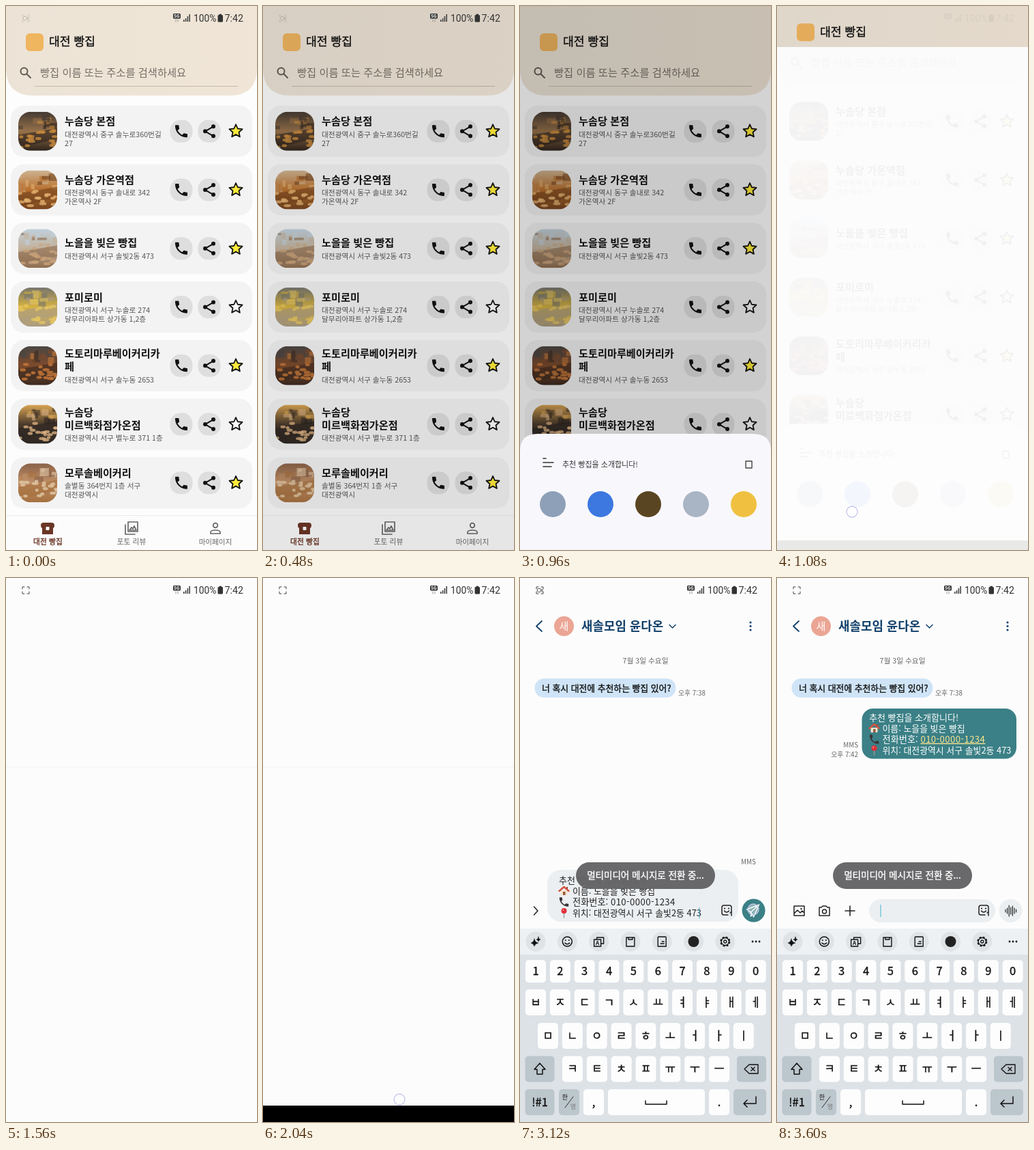
These frames come from a looping animation (368 px wide and 796 px high, 3.72 s). An HTML page:

```html
<!DOCTYPE html>
<html lang="ko">
<head>
<meta charset="utf-8">
<title>빵집 공유</title>
<style>
  html, body { margin: 0; width: 100%; height: 100%; overflow: hidden; background: #f5f5f3; }
  svg { display: block; width: 100vw; height: 100vh; font-family: 'Noto Sans CJK KR', 'Noto Sans CJK', 'Noto Sans KR', sans-serif; }
</style>
</head>
<body>
<svg id="stage" viewBox="0 0 368 796"></svg>
<script>
const LOOP = 3720, STEP = 120, PAGE = '#fcfcfc', NAVY = '#12416b', INK = '#111';

// Drawing helpers; text y is the visual middle of the line.
const rect = (x, y, w, h, r, fill, more = '') =>
  `<rect x="${x}" y="${y}" width="${w}" height="${h}" rx="${r}" fill="${fill}" ${more}/>`;
const circle = (x, y, r, fill, more = '') => `<circle cx="${x}" cy="${y}" r="${r}" fill="${fill}" ${more}/>`;
const ring = (x, y, r, stroke, w, more = '') => circle(x, y, r, 'none', `stroke="${stroke}" stroke-width="${w}" ${more}`);
const line = (d, stroke = INK, w = 1.5, fill = 'none') =>
  `<path d="${d}" stroke="${stroke}" stroke-width="${w}" fill="${fill}" stroke-linecap="round" stroke-linejoin="round"/>`;
const text = (x, y, s, size, fill = INK, more = '') =>
  `<text x="${x}" y="${y + size * .36}" font-size="${size}" fill="${fill}" ${more}>${s}</text>`;
const mid = (x, y, s, size, fill, more = '') => text(x, y, s, size, fill, 'text-anchor="middle" ' + more);
const at = (x, y, body) => `<g transform="translate(${x} ${y})">${body}</g>`;
const group = (id, body) => `<g id="${id}">${body}</g>`;
const BOLD = 'font-weight="700"', ROBOTO = 'font-family="Roboto, sans-serif"';
// A hairline outline gives a weight between regular and bold.
const medium = colour => `stroke="${colour}" stroke-width=".35"`;

// Icons, centred on 0,0
const phonePath = 'M6.6 10.8c1.4 2.8 3.8 5.1 6.6 6.6l2.2-2.2c.3-.3.7-.4 1-.2 1.1.4 2.3.6 3.6.6.6 0 1 .4 1 1V20c0 .6-.4 1-1 1C10.6 21 3 13.4 3 4c0-.6.4-1 1-1h3.5c.6 0 1 .4 1 1 0 1.2.2 2.4.6 3.6.1.3 0 .7-.3 1z';
const phone = (fill, k = 1) => `<path transform="scale(${k}) translate(-12 -12)" d="${phonePath}" fill="${fill}"/>`;
const share = line('M6-7L-6 0L6 7', INK, 2) + circle(6, -7, 3, INK) + circle(-6, 0, 3, INK) + circle(6, 7, 3, INK);
const star = on => {
  const pts = Array.from({ length: 10 }, (_, i) => {
    const a = Math.PI * (i / 5 - .5), r = i % 2 ? 4.7 : 10;
    return (r * Math.cos(a)).toFixed(2) + ' ' + (r * Math.sin(a)).toFixed(2);
  });
  return line('M' + pts.join('L') + 'Z', INK, 1.8, on ? '#ffeb3b' : '#fafafa');
};
const house = rect(-5, -1, 10, 7, 1, '#f3e3cf') + line('M-7 0L0-6L7 0', '#d4523e', 2.4) +
  rect(-1.5, 1, 3.5, 5, 0, '#9a5a3c') + rect(3.5, -6, 2, 3, 0, '#a8493a');
const pin = line('M0 0V7', '#999', 1.4) + circle(0, -3, 4, '#df2f38') + circle(-1.2, -4.2, 1.1, '#ff9a9a');
const sticker = line('M7 2V-4Q7-7 4-7H-4Q-7-7-7-4V4Q-7 7-4 7H2M-3.5 1Q0 5 3.5 1', '#222', 1.5) +
  circle(-3, -2.5, 1.1, '#222') + circle(3, -2.5, 1.1, '#222') + line('M5 4L7 2.5V8', '#222', 1.5);
const plane = line('M9-9L-9-2L-3 2L1 9ZM-3 2L9-9M-3 2V8L0 5', '#fff', 1.4);

// Bakery list: names, address, favourite, photo tones
const shops = [
  [['누솜당 본점'], ['대전광역시 중구 솔누로360번길', '27'], 1, ['#453a32', '#96714a', '#2f241d', '#c88a3c']],
  [['누솜당 가온역점'], ['대전광역시 동구 솔내로 342', '가온역사 2F'], 1, ['#cdb391', '#b8702e', '#74441f', '#e2b070']],
  [['노을을 빚은 빵집'], ['대전광역시 서구 솔빛2동 473'], 1, ['#c0d0dc', '#c3b29c', '#8d6c4e', '#c9a27a']],
  [['포미로미'], ['대전광역시 서구 누솔로 274', '달무리아파트 상가동 1,2층'], 0, ['#77766e', '#d6b23f', '#aa9c86', '#e6c660']],
  [['도토리마루베이커리카', '페'], ['대전광역시 서구 솔누동 2653'], 1, ['#4a4643', '#7d4a2b', '#3c2a20', '#c87a3a']],
  [['누솜당', '미르백화점가온점'], ['대전광역시 서구 별누로 371 1층'], 0, ['#d9a552', '#4a3a2c', '#2c2622', '#d9b080']],
  [['모루솔베이커리'], ['솔별동 364번지 1층 서구', '대전광역시'], 1, ['#8a6248', '#c09068', '#a5703f', '#e2c8a6']]
];
let seed = 7;
const rnd = () => (seed = seed * 16807 % 2147483647) / 2147483647;

function photo(i, tones) {
  const [top, wall, floor, bread] = tones;
  let s = `<linearGradient id="g${i}" x2="0" y2="1"><stop stop-color="${top}"/><stop offset=".5" stop-color="${wall}"/><stop offset="1" stop-color="${floor}"/></linearGradient>` +
    rect(0, 0, 57, 57, 0, `url(#g${i})`);
  for (let n = 0; n < 12; n++)
    s += rect(rnd() * 50, 4 + rnd() * 18, 4 + rnd() * 10, 3 + rnd() * 9, 0, tones[n % 4], 'opacity=".6"');
  s += `<path d="M0 34L57 24V40L0 53Z" fill="${floor}" opacity=".6"/>`;
  for (let n = 0; n < 18; n++)
    s += `<ellipse cx="${rnd() * 57}" cy="${26 + rnd() * 26}" rx="${2.5 + rnd() * 3}" ry="2.2" fill="${bread}" opacity=".8"/>`;
  return `<g clip-path="url(#round)">${s}</g>`;
}

function card([names, lines, fav, tones], i) {
  const c = 183.3 + 85.75 * i;
  const top = c - (19 * names.length + 13 * lines.length + 3) / 2;
  const below = top + 19 * names.length + 3;
  return rect(7, c - 37.5, 354, 75, 19, '#f3f3f3') + at(18, c - 28.5, photo(i, tones)) +
    names.map((s, n) => text(86, top + 9.5 + 19 * n, s, 15.2, INK, BOLD)).join('') +
    lines.map((s, n) => text(86, below + 6.5 + 13 * n, s, 10.7, '#555')).join('') +
    rect(240.5, c - 16.5, 33, 33, 15, '#dedede') + rect(281.5, c - 16.5, 33, 33, 15, '#dedede') +
    at(257, c, phone(INK)) + at(298, c, share) + at(337, c, star(fav));
}

const list = rect(0, 0, 368, 796, 0, '#fdfdfd') +
  '<path d="M0 0H368V91Q368 131 328 131H40Q0 131 0 91Z" fill="url(#cream)"/>' +
  rect(29, 40, 26, 26, 6, '#f0b55f') + text(63, 52, '대전 빵집', 17.2, INK, medium(INK)) +
  ring(26.5, 95.5, 5, '#5f5a54', 2) + line('M30.5 99.5L36 105', '#5f5a54', 2) +
  text(50, 97, '빵집 이름 또는 주소를 검색하세요', 15.3, '#776f67') + rect(42, 117, 298, 1, 0, '#c3b9ad') +
  shops.map(card).join('') +
  rect(0, 745, 368, 51, 0, '#fcfcfc') + rect(0, 745, 368, 1, 0, '#ececec') +
  '<path d="M55 756H67Q71 756 71 760Q71 763 69 764V773H53V764Q51 763 51 760Q51 756 55 756Z" fill="#6b3626"/>' +
  rect(58.5, 762, 5, 5, 1, '#fff') +
  line('M175 759V773H189M179 755H193V769H179ZM181 767L184 763L186 765L188 761L191 767Z', '#666', 1.7) +
  ring(307, 760, 3.3, '#666', 1.7) + line('M300 772V770Q300 767 307 767Q314 767 314 770V772Z', '#666', 1.7) +
  mid(61.5, 784, '대전 빵집', 10.8, '#6b3626', medium('#6b3626')) +
  mid(184, 784, '포토 리뷰', 10.8, '#666') + mid(307, 784, '마이페이지', 10.6, '#666');

const sheet = '<path d="M0 796V652Q0 626 26 626H342Q368 626 368 652V796Z" fill="#f8f8fc"/>' +
  line('M34 662H38M34 668H49M34 674H46', '#333', 1.6) + text(62, 671, '추천 빵집을 소개합니다!', 11, '#333') +
  line('M331 666H340V676H331Z', '#444', 1.4) +
  ['#8ea0b8', '#3c78e0', '#5a4522', '#a9b4c4', '#f0c040'].map((c, i) => circle(48 + 70 * i, 729, 19, c)).join('');

// Conversation
const message = (x, gap, ink, link) =>
  text(x, 0, '추천 빵집을 소개합니다!', 13, ink) +
  at(x + 7.5, 16, house) + text(x + gap, 16, '이름: 노을을 빚은 빵집', 12.9, ink) +
  at(x + 7.5, 32, phone('#3a3436', .75)) +
  text(x + gap, 32, `전화번호: <tspan letter-spacing=".4" ${link}>010-0000-1234</tspan>`, 13.2, ink) +
  at(x + 7.5, 48, pin) + text(x + gap, 48, '위치: 대전광역시 서구 솔빛2동 473', 12.9, ink);

const chat = rect(0, 0, 368, 796, 0, PAGE) +
  line('M32 63L24 70.5L32 78', NAVY, 1.8) + circle(64.5, 70.5, 14.5, '#eba594') + mid(64.5, 70.5, '새', 15, '#fff') +
  text(90, 70.5, '새솔모임 윤다온', 17.9, NAVY, BOLD) + line('M219 68.5L223.5 73L228 68.5', NAVY, 1.5) +
  [65, 70.5, 76].map(y => circle(338, y, 1.6, NAVY)).join('') +
  mid(184, 121, '7월 3일 수요일', 10.7, '#666') +
  rect(21.5, 147, 207, 28, 14, '#cfe4f7') +
  text(32, 161, '너 혹시 대전에 추천하는 빵집 있어?', 12.85, INK, medium(INK)) +
  text(232, 168.5, '오후 7:38', 9.8, '#666');

const draft = rect(40, 711, 280, 76, 20, '#eceff1') + at(0, 726, message(57, 20, '#222', '')) +
  rect(262.5, 766, 1, 16, 0, '#3fb0cf') + at(303, 770, sticker) + line('M20.5 765L26 771L20.5 777', '#222', 1.5) +
  circle(342.5, 770.5, 17, '#3b8086') + at(341.5, 771, plane) + text(324, 699, 'MMS', 9.8, '#666');

const toast = rect(82, 700, 204, 39, 19.5, '#656567', 'opacity=".97"') +
  mid(184, 719.5, '멀티미디어 메시지로 전환 중...', 13.5, '#fff', medium('#fff'));

const sent = rect(124.5, 191, 226.5, 73.5, 16, '#3b8086') +
  at(0, 204, message(135, 19.5, '#fff', 'fill="#ffe58f" text-decoration="underline"')) +
  text(119, 244, 'MMS', 9.8, '#666', 'text-anchor="end"') + text(119, 258, '오후 7:42', 9.8, '#666', 'text-anchor="end"') +
  line('M25 480H40V494H25ZM25 491L30 486L34 490L37 487L40 490', '#222', 1.5) + circle(35.5, 484, 1.2, '#222') +
  line('M62 482H65L67 480H72L74 482H77V494H62Z', '#222', 1.5) + ring(69.5, 488, 3, '#222', 1.5) +
  line('M107 480V494M100 487H114', '#222', 1.6) +
  rect(135, 470, 185, 34, 17, '#eceff1') + rect(151.5, 478, 1, 18, 0, '#3fb0cf') + at(303, 486, sticker) +
  circle(342.5, 487, 17, '#eceff1') +
  [2, 4, 8, 5, 7, 4, 2].map((h, i) => line(`M${335 + i * 2.6} ${487 - h}v${2 * h}`, '#222', 1.2)).join('');

// Keyboard
const GREY = '#bcc6cd';
const key = (c, y, h, s, w = 30, fill = '#fdfdfd') =>
  rect(c - w / 2, y - h / 2, w, h, 5, fill) + mid(c, y, s, 16.5, INK, medium(INK));
const row = (chars, x, y, h = 38) => [...chars].map((s, i) => key(x + 35.85 * i, y, h, s)).join('');
const tools = [
  line('M-2-4Q-1 1 4 2Q-1 3-2 7Q-3 3-7 2Q-3 1-2-4ZM4-7L5-4L7-3L5-2L4 0L3-2L1-3L3-4Z', INK, .5, INK),
  ring(0, 0, 7, INK, 1.5) + circle(-2.5, -2, 1, INK) + circle(2.5, -2, 1, INK) + line('M-3.5 2Q0 5.5 3.5 2'),
  line('M-3-3V-6H7V3H3M-7-3H3V7H-7Z', INK, 1.4) + mid(-2, 2, 'A', 8, INK, BOLD),
  line('M-6-6H6V7H-6ZM-3-6V-3H3V-6', INK, 1.4),
  line('M-5-7H5Q6-7 6-6V7H-6V-6Q-6-7-5-7ZM-2 3H3M0 0H3', INK, 1.4),
  circle(0, 0, 8, '#222'),
  ring(0, 0, 6.5, INK, 2, 'stroke-dasharray="3.1 2"') + ring(0, 0, 5.5, INK, 1.3) + ring(0, 0, 2, INK, 1.3)
];
const keyboard = rect(0, 513, 368, 283, 0, '#dde2e7') + rect(0, 513, 368, 38, 0, '#eef1f3') +
  tools.map((s, i) => at(23 + 46.3 * i, 532, circle(0, 0, 14.5, '#dfe3e6') + s)).join('') +
  [341, 346, 351].map(x => circle(x, 532, 1.4, INK)).join('') +
  row('1234567890', 23, 575.5, 33) + row('ㅂㅈㄷㄱㅅㅛㅕㅑㅐㅔ', 23, 621) + row('ㅁㄴㅇㄹㅎㅗㅓㅏㅣ', 41, 670) + row('ㅋㅌㅊㅍㅠㅜㅡ', 77, 718.5) +
  key(29, 718.5, 38, '', 43, GREY) + line('M29 710L37 719H33V726H25V719H21Z') +
  key(339.5, 718.5, 38, '', 43, GREY) + line('M336 712H349V725H336L329 718.5ZM339 716L344 721M344 716L339 721', INK, 1.4) +
  key(29, 767, 38, '!#1', 43, GREY) + key(72, 767, 38, '', 30, GREY) +
  mid(66, 760, '한', 9) + mid(78, 774, '영', 9, '#777') + line('M66 775L78 759', '#333', 1) +
  key(108, 767, 38, ',') + key(200, 767, 38, '', 142) + line('M184 765V770H215V765') + key(292, 767, 38, '.') +
  key(337, 767, 38, '', 48, GREY) + line('M346 759V769H328M333 764L328 769L333 774');

const status = group('frame', line('M24 16V13H27M31 13H34V16M34 20V23H31M27 23H24V20', '#444', 1)) +
  group('rec', rect(25.5, 15.5, 5, 5, 1, 'none', 'stroke="#555"') + line('M31 18L33 16V20Z', '#555', .8)) +
  rect(245, 11, 11, 7.5, 1.5, '#333') + mid(250.5, 14.7, '5G', 6.5, '#fff', BOLD) + line('M249 20V23M252 20V23', '#999', 1) +
  [3, 5, 8, 11].map((h, i) => rect(260 + 2.8 * i, 23 - h, 1.6, h, 0, '#444')).join('') +
  text(275, 18, '100%', 13.8, '#333', ROBOTO) +
  rect(310.5, 13, 7.5, 10.5, 1.5, '#333') + rect(312.5, 11.8, 3.5, 2, 0, '#333') +
  text(320.5, 18, '7:42', 14.2, '#333', ROBOTO);

document.getElementById('stage').innerHTML =
  '<defs><linearGradient id="cream"><stop stop-color="#ece3d6"/><stop offset="1" stop-color="#f0e5d6"/></linearGradient>' +
  '<clipPath id="round"><rect width="57" height="57" rx="18"/></clipPath></defs>' +
  rect(0, 0, 368, 796, 0, '#f5f5f3') +
  group('list', list) + group('dim', rect(0, 0, 368, 796, 0, '#000')) + group('sheet', sheet) +
  group('veil', rect(0, 60, 368, 722, 0, '#fdfdfe')) +
  group('blank', rect(0, 0, 368, 796, 0, PAGE) + rect(0, 276, 368, 1, 0, '#f1f1f1')) +
  group('bar', rect(0, 772, 368, 24, 0, '#000')) +
  group('chat', chat) + group('draft', draft) + group('sent', sent) + group('toast', toast) + group('keys', keyboard) +
  group('status', status) + group('touch', circle(0, 0, 8, '#fff', 'fill-opacity=".4" stroke="#c3c6ea" stroke-width="1.3"'));

// Motion
const ramp = (t, a, b) => Math.min(1, Math.max(0, (t - a) / (b - a)));
const ease = k => 1 - (1 - k) ** 3;
const put = (id, opacity, y = 0, x = 0) => {
  const el = document.getElementById(id);
  el.style.display = opacity ? '' : 'none';
  el.setAttribute('opacity', +opacity);
  el.setAttribute('transform', `translate(${x} ${y})`);
};
// from, to, x, y
const taps = [[240, 360, 298, 354], [1080, 1200, 110, 740], [1920, 2040, 200, 763], [3120, 3120, 342, 485]];

function draw(now) {
  const t = Math.floor(now % LOOP / STEP) * STEP;
  const app = t < 1200, leaving = t === 1080, shift = leaving ? -14.5 : 0;
  const up = ease(ramp(t, 2520, 3000)), lift = -284 * up;
  put('list', app, shift);
  put('dim', app && (leaving ? .05 : .17 * ramp(t, 360, 600)));
  put('sheet', app && t > 600, shift + 170 * (1 - ease(ramp(t, 600, 960))));
  put('veil', leaving && .95);
  put('blank', !app && t < 2520);
  put('bar', t >= 1920 && t <= 2040);
  put('chat', ramp(t, 2040, 2400));
  put('draft', t < 3360 && ramp(t, 2040, 2400), lift);
  put('toast', ramp(t, 2280, 2520), lift);
  put('sent', t >= 3360);
  put('keys', t > 2520, 284 * (1 - up));
  put('status', t < 600 || !app ? 1 : leaving && .06);
  put('frame', app ? .15 : 1);
  put('rec', app ? .3 : t > 2300 && t < 3300);
  const tap = taps.find(([a, b]) => t >= a && t <= b);
  put('touch', !!tap, tap ? tap[3] : 0, tap ? tap[2] : 0);
}

let start;
function tick(now) {
  start ??= now;
  draw(now - start);
  requestAnimationFrame(tick);
}
draw(0);
requestAnimationFrame(tick);
</script>
</body>
</html>
```
